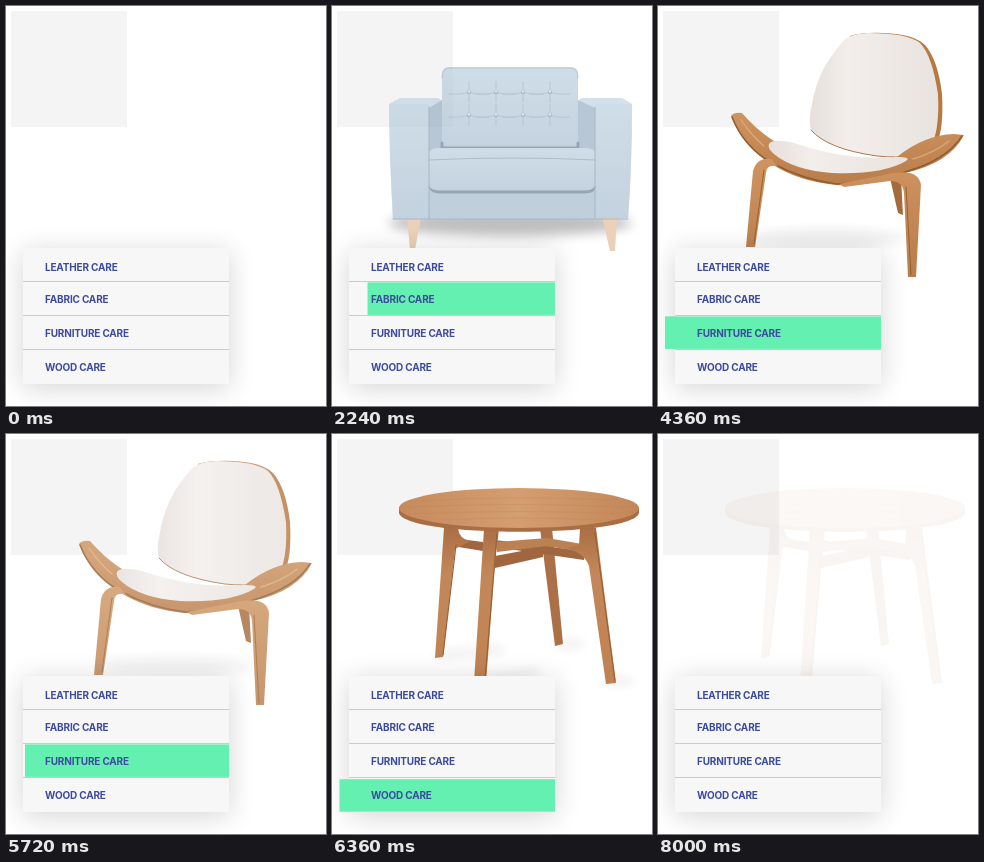
An HTML page for the animation above (8020 ms loop, 320 by 400 pixels).

```html
<!DOCTYPE html>
<html lang="en">
<head>
<meta charset="utf-8">
<title>Furniture care</title>
<style>
html, body { margin: 0; width: 100%; height: 100%; overflow: hidden; background: #fff; }
svg { display: block; width: 320px; height: 400px; }
text { font: 700 10px Inter, Arial, sans-serif; letter-spacing: -.18px; fill: #3c4a9f; }
.item { opacity: 0; }
.line { fill: none; stroke-linecap: round; stroke-linejoin: round; }
</style>
</head>
<body>
<svg viewBox="0 0 320 400">
<defs>
  <filter id="blur" x="-60%" y="-60%" width="220%" height="220%"><feGaussianBlur stdDeviation="6"/></filter>
  <filter id="glow" x="-50%" y="-80%" width="200%" height="260%"><feGaussianBlur stdDeviation="14"/></filter>
  <linearGradient id="leather" x2="1" y2="1"><stop stop-color="#3c3d3e"/><stop offset=".55" stop-color="#555657"/><stop offset="1" stop-color="#343536"/></linearGradient>
  <linearGradient id="seat"><stop stop-color="#454647"/><stop offset=".6" stop-color="#606162"/><stop offset="1" stop-color="#464748"/></linearGradient>
  <linearGradient id="chrome"><stop stop-color="#707274"/><stop offset=".35" stop-color="#c9cbcd"/><stop offset=".6" stop-color="#8e9092"/><stop offset="1" stop-color="#c2c4c6"/></linearGradient>
  <linearGradient id="fabric" x2="0" y2="1"><stop stop-color="#b5cbdc"/><stop offset="1" stop-color="#a1b9cd"/></linearGradient>
  <linearGradient id="oak" x2="0" y2="1"><stop stop-color="#cf945f"/><stop offset="1" stop-color="#b97c4a"/></linearGradient>
  <linearGradient id="pad"><stop stop-color="#e6dfdb"/><stop offset=".3" stop-color="#f3eeeb"/><stop offset="1" stop-color="#e9e3df"/></linearGradient>
  <linearGradient id="top"><stop stop-color="#c48655"/><stop offset=".5" stop-color="#d29a6a"/><stop offset="1" stop-color="#c18151"/></linearGradient>
  <linearGradient id="leg" x2="0" y2="1"><stop stop-color="#a8683c"/><stop offset=".3" stop-color="#c18252"/><stop offset="1" stop-color="#bd7c4b"/></linearGradient>
</defs>

<rect x="5" y="5" width="116" height="116" fill="#f4f4f4"/>

<!-- leather chair -->
<g class="item">
  <ellipse cx="222" cy="216" rx="84" ry="26" fill="#000" opacity=".24" filter="url(#glow)"/>
  <g class="line" stroke="url(#chrome)">
    <path d="M166 191Q192 187 216 168" stroke-width="4"/>
    <path d="M214 167Q242 193 304 201" stroke-width="4.5"/>
    <path d="M87 233H106Q143 219 162 196Q180 178 218 166" stroke-width="4.5"/>
  </g>
  <path class="line" d="M82 41C87 99 111 170 158 203Q184 224 217 238" stroke="#37393b" stroke-width="5.5"/>
  <path class="line" d="M80 41C84 100 108 171 151 204Q182 230 224 252L273 258" stroke="url(#chrome)" stroke-width="4"/>
  <path d="M84 45Q83 40 88 39L113 35L166 30Q173 29 176 36L191 78L207 131L128 161Q123 160 121 153L101 95Z" fill="url(#leather)"/>
  <path d="M127 161L204 131L292 111Q307 110 309 117L306 129L278 155L200 166L138 176Q127 171 127 161Z" fill="url(#seat)"/>
  <path d="M127 162L274 141L309 117L306 130L278 155L200 166L138 176Q127 171 127 162Z" fill="#353637"/>
  <path class="line" d="M129 163L274 141L308 117" stroke="#737476"/>
  <path class="line" d="M281 153L305 133" stroke="#1a1b1c" stroke-width="7" stroke-dasharray="4 1.4" style="stroke-linecap:butt"/>
  <g id="tufts" class="line"></g>
</g>

<!-- fabric armchair -->
<g class="item">
  <ellipse cx="178" cy="217" rx="122" ry="13" fill="#000" opacity=".4" filter="url(#blur)"/>
  <path d="M75 211H89L83 244H78ZM270 211H285L283 245H278Z" fill="#dfb78f"/>
  <path d="M110 68Q110 61 117 61H239Q246 61 246 68V148H110Z" fill="url(#fabric)"/>
  <path class="line" d="M110 72Q110 62 118 62H238Q246 62 246 72" stroke="#90a9bf"/>
  <path d="M57 98L68 92H106Q110 93 110 98V150H97V213H61Q57 150 57 98ZM246 97Q247 92 251 92H290L300 98Q300 160 296 212H263V150H246Z" fill="#bdd1e0"/>
  <path d="M57 98H94Q97 98 97 102V213H61Q58 160 57 98ZM263 102Q263 98 267 98H300Q300 160 296 212H263Z" fill="url(#fabric)"/>
  <path d="M97 102L110 94V150H97ZM263 102L246 94V150H263Z" fill="#8fa8be"/>
  <path d="M97 145H263V213H97Z" fill="#9cb4c8"/>
  <path class="line" d="M110 137V142H246V137M98 181Q100 186 108 186H252Q262 186 262 181" stroke="#5b7489" stroke-width="3"/>
  <path d="M96 149Q98 142 106 142H254Q263 142 264 149V177Q263 184 255 184H104Q97 184 96 177Z" fill="url(#fabric)"/>
  <path class="line" d="M97 154Q180 150 263 154" stroke="#7f99af"/>
  <path class="line" d="M97 101V213M263 101V212M61 213H296" stroke="#758ea4"/>
  <g id="buttons"></g>
</g>

<!-- shell chair -->
<g class="item">
  <ellipse cx="170" cy="232" rx="82" ry="10" fill="#000" opacity=".06" filter="url(#blur)"/>
  <path d="M232 172H243L245 209L240 207Z" fill="#a66a3a"/>
  <path d="M192 30Q205 26 226 27Q256 28 267 39Q280 54 284 88Q286 125 278 138Q268 156 235 152L180 120Z" fill="#b7783f"/>
  <path d="M183 38Q189 28 210 27Q250 27 262 37Q274 49 280 88Q282 128 271 143Q259 154 219 150Q169 143 153 124Q150 116 154 98Q160 63 183 38Z" fill="url(#pad)"/>
  <path class="line" d="M153 124Q169 143 219 150Q259 154 271 143" stroke="#a9774e"/>
  <path d="M73 110Q76 106 84 107Q110 137 143 148Q200 159 239 151Q266 129 296 128L306 129Q292 157 247 167Q213 181 178 179Q139 175 112 157Q84 140 73 110Z" fill="url(#oak)"/>
  <path class="line" d="M74 111Q86 141 114 157Q145 174 179 178Q220 176 247 166Q289 154 304 130" stroke="#925b2d" stroke-width="1.5"/>
  <path class="line" d="M83 114Q94 130 106 140M255 153Q278 146 291 135" stroke="#dba66f" stroke-width="1.5"/>
  <path d="M111 138Q115 132 136 137Q187 155 238 151Q254 151 248 155Q224 169 174 167Q135 164 116 148Q109 142 111 138Z" fill="url(#pad)"/>
  <path d="M121 161Q109 157 108 167L97 241H88L95 165Q99 151 113 153ZM181 178L235 167Q261 163 263 179L258 271H250L246 187Q245 175 232 175L186 181Z" fill="url(#oak)"/>
  <path class="line" d="M106 164L96 238M248 181L253 269" stroke="#98602f"/>
</g>

<!-- round table -->
<g class="item">
  <path d="M105 221L170 216M144 246L205 238M222 210H250M274 247H300" class="line" stroke="#000" stroke-width="5" opacity=".12" filter="url(#blur)"/>
  <path d="M208 94H220L231 210L223 212Z" fill="#a76a40"/>
  <path d="M120 104L151 108V117L120 112ZM163 122L211 113L211 123L163 134ZM163 106L252 117V126L163 113Z" fill="#9b5f37"/>
  <path d="M165 108L215 104L256 111V119L215 112L165 118Z" fill="#b97b4b"/>
  <path d="M112 94H126Q127 105 138 107L123 115L111 223L103 224ZM152 95H167L163 130L154 248H142ZM248 94H264L284 249L274 250L257 132Q253 120 235 114L247 111Z" fill="url(#leg)"/>
  <path class="line" d="M165 99L153 246M263 98L283 247M124 111L111 221" stroke="#95592f" stroke-width="1.2"/>
  <path d="M67 73V79C73 104 301 104 307 79V73Z" fill="#a5673b"/>
  <ellipse cx="187" cy="74" rx="120" ry="20" fill="url(#top)"/>
  <g class="line" stroke="#b97c4d" stroke-width=".6" opacity=".55">
    <path d="M90 67Q180 61 281 66M77 73Q180 68 297 73M83 80Q190 75 290 80M110 86Q190 82 264 86"/>
  </g>
</g>

<!-- menu -->
<rect x="17" y="246" width="206" height="136" fill="#000" opacity=".17" filter="url(#glow)"/>
<rect x="17" y="242" width="206" height="136" fill="#f7f7f7"/>
<path d="M17 275.5H223M17 309.5H223M17 343.5H223" stroke="#cbcbcb"/>
<rect id="bar" height="32.5" fill="#64f0b0"/>
<text x="39" y="264.7">LEATHER CARE</text>
<text x="39" y="297.2">FABRIC CARE</text>
<text x="39" y="331.2">FURNITURE CARE</text>
<text x="39" y="364.7">WOOD CARE</text>
</svg>
<script>
const $ = id => document.getElementById(id);
const mix = (a, b, t) => a + (b - a) * t;
const clamp = v => Math.max(0, Math.min(1, v));

// Point in a quad given as top-left, top-right, bottom-right, bottom-left.
const inQuad = ([a, b, c, d], u, v) =>
  [0, 1].map(k => mix(mix(a[k], b[k], u), mix(d[k], c[k], u), v));

function tuft(quad, cols, rows) {
  let seams = '', dots = '';
  const seam = (u, v, u2, v2, bend) => {
    const mid = inQuad(quad, (u + u2) / 2 + bend / cols, (v + v2) / 2 + bend / rows);
    seams += `M${inQuad(quad, u, v)}Q${mid} ${inQuad(quad, u2, v2)}`;
  };
  for (let i = 0; i <= cols; i++) for (let j = 0; j <= rows; j++) {
    const u = i / cols, v = j / rows, bend = (i + j) % 2 ? .12 : -.12;
    if (i && i < cols && j < rows) seam(u, v, u, v + 1 / rows, bend);
    if (j && j < rows && i < cols) seam(u, v, u + 1 / cols, v, bend);
    if (i && j && i < cols && j < rows) dots += `M${inQuad(quad, u, v)}h.1`;
  }
  return `<path d="${seams}" stroke="#828384" stroke-width="3" opacity=".4"/>
    <path d="${seams}" stroke="#28292a" stroke-width="1.2"/>
    <path d="${dots}" stroke="#1d1e1f" stroke-width="3"/>`;
}
$('tufts').innerHTML =
  tuft([[86, 40], [173, 31], [205, 131], [127, 159]], 4, 5) +
  tuft([[204, 132], [302, 112], [274, 140], [131, 161]], 5, 3);

let buttons = '';
for (const y of [86, 109]) for (let i = 0; i < 4; i++) {
  const x = 137 + i * 27;
  buttons += `<path class="line" d="M${x - 20} ${y + 2}Q${x - 8} ${y + 3} ${x} ${y}Q${x + 8} ${y + 3} ${x + 20} ${y + 2}M${x} ${y - 10}V${y + 10}" stroke="#8ba4ba" stroke-width=".9"/>
    <circle cx="${x}" cy="${y}" r="2.2" fill="#758fa6"/><circle cx="${x}" cy="${y - .6}" r="1.4" fill="#c3d5e2"/>`;
}
$('buttons').innerHTML = buttons;

const LOOP = 8020, IN = 410, FADE = 330, WIPE = 280;
const steps = [
  { on: 20, off: 1702, y: 242.3 },
  { on: 1980, off: 3675, y: 276.4 },
  { on: 3955, off: 5655, y: 310.4 },
  { on: 5970, off: 7690, y: 345.2 }
];
const items = document.querySelectorAll('.item'), bar = $('bar');

function draw(now) {
  const t = now % LOOP;
  let width = 0;
  steps.forEach(({ on, off, y }, i) => {
    const enter = clamp((t - on) / IN);
    items[i].style.opacity = enter * (1 - clamp((t - off) / FADE));
    const w = 216 * (1 - (1 - enter) ** 2) * (1 - clamp((t - off) / WIPE) ** 2);
    if (w > 0) {
      width = w;
      bar.setAttribute('y', y);
    }
  });
  bar.setAttribute('x', 223 - width);
  bar.setAttribute('width', width);
}

const start = performance.now();
function tick() {
  draw(performance.now() - start);
  requestAnimationFrame(tick);
}
draw(0);
requestAnimationFrame(tick);
</script>
</body>
</html>
```
